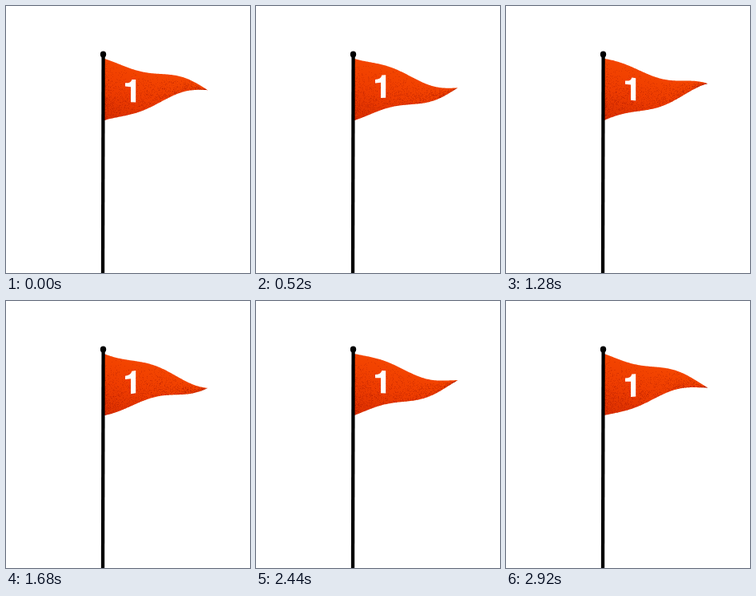
Animation, 305 px wide and 334 px high, one loop 2.96 s. Source, as an HTML page with a canvas:

```html
<!DOCTYPE html>
<html lang="en">
<head>
<meta charset="utf-8">
<title>Waving flag</title>
<style>
  html, body { margin: 0; width: 100%; height: 100%; overflow: hidden; background: #fff; }
  canvas { display: block; }
</style>
</head>
<body>
<canvas id="stage" width="305" height="334" role="img" aria-label="Flag with the number 1"></canvas>
<script>
const ctx = document.getElementById('stage').getContext('2d');
const LOOP = 2960;
const CYCLE = 1000;
const STEPS = 12;
const LEFT = 123, TIP = 252;
const TOP = 66, BOTTOM = 143, TIP_Y = 103.7;
const WAVELENGTH = 123;

const lerp = (a, b, u) => a + (b - a) * u;
const along = x => Math.max(0, (x - LEFT) / (TIP - LEFT));

// A wave runs from the pole to the tip and grows on its way.
function wave(x, step) {
  const angle = 2 * Math.PI * ((step - 9.4) / STEPS + (TIP - x) / WAVELENGTH);
  return 6.9 * Math.pow(along(x), 0.7) * Math.cos(angle);
}

const edge = (x, start, step) => lerp(start, TIP_Y, along(x)) + wave(x, step);

// The first pose of each cycle is held longer.
function stepAt(time) {
  const t = time % LOOP % CYCLE;
  return t < 120 ? 0 : Math.floor((t - 40) / 80);
}

function seeded(seed) {
  return () => (seed = seed * 16807 % 2147483647) / 2147483647;
}

function clothPath(step) {
  ctx.beginPath();
  for (let x = LEFT; x <= TIP; x++) ctx.lineTo(x, edge(x, TOP, step));
  for (let x = TIP; x >= LEFT; x--) ctx.lineTo(x, edge(x, BOTTOM, step));
  ctx.closePath();
}

function drawGrain(step) {
  const random = seeded(4211 + step * 97);
  ctx.fillStyle = 'rgba(160, 22, 0, 0.22)';
  for (let i = 0; i < 1500; i++) {
    const u = Math.pow(random(), 1.5);
    const v = Math.sqrt(random());
    const x = lerp(LEFT, TIP, u);
    const y = lerp(edge(x, TOP, step), edge(x, BOTTOM, step), v);
    ctx.fillRect(Math.round(x), Math.round(y), 1, 1);
  }
}

function drawCloth(step) {
  const shade = ctx.createLinearGradient(160, 72, 140, 146);
  shade.addColorStop(0, '#f44600');
  shade.addColorStop(0.5, '#ee3c00');
  shade.addColorStop(1, '#dc3000');
  ctx.save();
  clothPath(step);
  ctx.fillStyle = shade;
  ctx.fill();
  ctx.clip();
  drawGrain(step);
  ctx.restore();
}

function drawNumeral(step) {
  const y = x => 103.4 + wave(x, step);
  ctx.beginPath();
  ctx.moveTo(157.3, y(157) - 14.2);
  ctx.lineTo(162.2, y(162) - 14.2);
  ctx.lineTo(162.2, y(162) + 14.2);
  ctx.lineTo(156, y(156) + 14.2);
  ctx.lineTo(156, y(156) - 4.9);
  ctx.lineTo(149, y(149) - 4.9);
  ctx.lineTo(149, y(149) - 9.2);
  ctx.quadraticCurveTo(156.3, y(156) - 9.2, 157.3, y(157) - 14.2);
  ctx.fillStyle = '#fff';
  ctx.fill();
}

function drawPole() {
  ctx.strokeStyle = ctx.fillStyle = '#000';
  ctx.lineWidth = 4.3;
  ctx.beginPath();
  ctx.moveTo(121.6, 60);
  ctx.lineTo(121, 336);
  ctx.stroke();
  ctx.beginPath();
  ctx.ellipse(121.5, 60.6, 3.7, 4.1, 0, 0, 2 * Math.PI);
  ctx.fill();
}

function draw() {
  const step = stepAt(performance.now() - start);
  ctx.fillStyle = '#fff';
  ctx.fillRect(0, 0, 305, 334);
  drawCloth(step);
  drawNumeral(step);
  drawPole();
  requestAnimationFrame(draw);
}

const start = performance.now();
draw();
</script>
</body>
</html>
```
